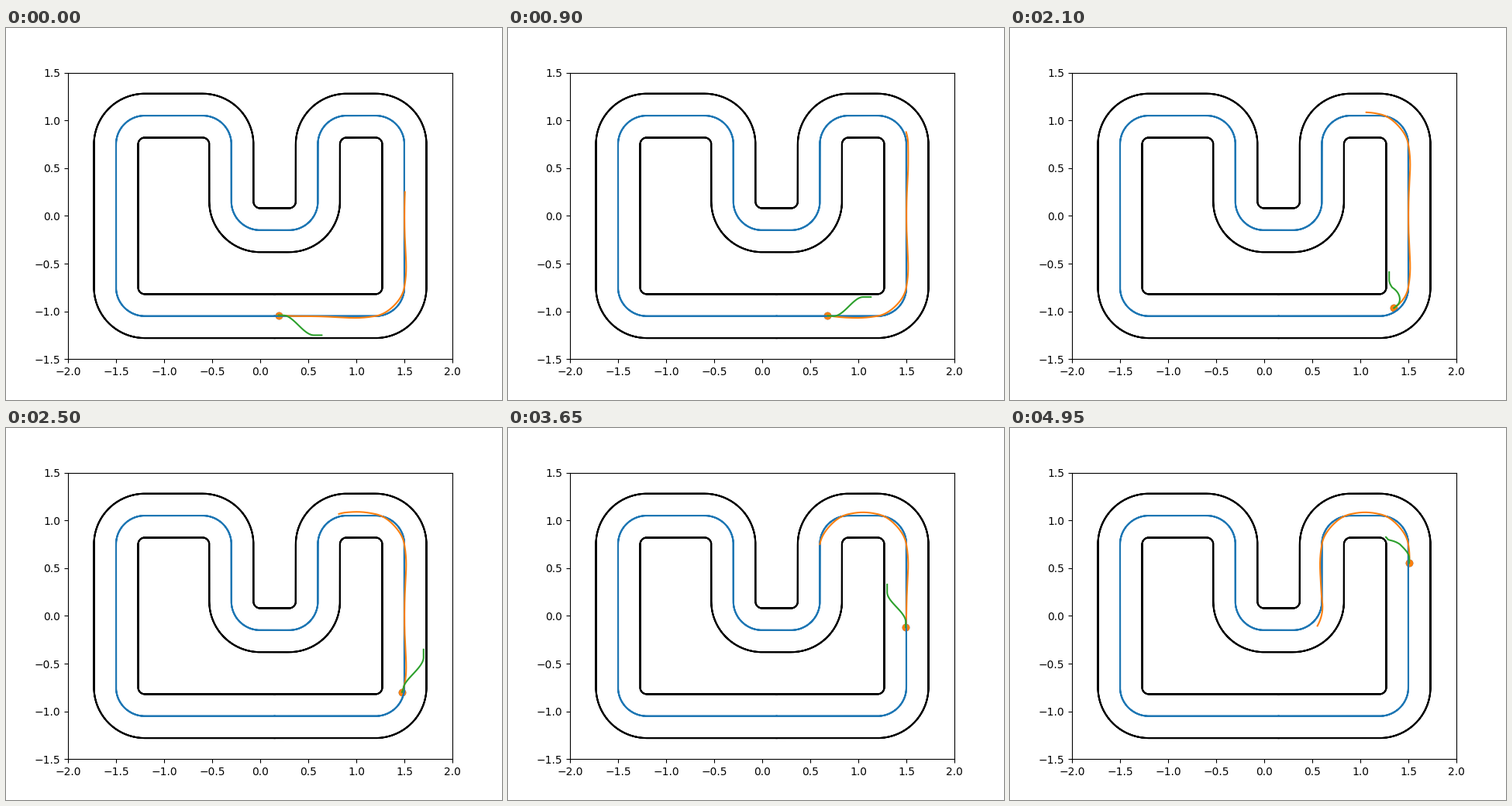
Recreate the animation shown at these times as a matplotlib script. Size 640 by 480 pixels, loop 5000 ms.

```python
import numpy as np
import matplotlib.pyplot as plt
from matplotlib.animation import FuncAnimation

FRAMES, STEP_MS = 100, 50
LAPS = 2
HALF_WIDTH = 0.23
RADIUS = 0.3
ARC = RADIUS * np.pi / 2

# Straight lengths, each followed by a quarter turn (+1 left, -1 right, 0 none).
STRAIGHTS = [1.05, 1.5, 0.3, 0.6, 0.3, 0.6, 0.6, 1.5, 1.35]
TURNS = [1, 1, 1, -1, -1, 1, 1, 1, 0]

# Car and horizon: time steps and distances along the track.
CAR = [0, 22, 73, 99], [0.04, 0.64, 2.15, 2.824]
HORIZON = [0, 22, 42, 58, 73, 99], [2.521, 3.28, 3.63, 4.105, 4.263, 5.1]
CAR_BIAS = 0.01

# The swerve aims at one side of the lane and flips at these steps.
FLIPS = [12, 50, 68, 77, 80, 87, 94]
SWERVE_SIDE, SWERVE_LENGTH = 0.2, 0.45


def build_segments():
    segments, s, pos, angle = [], 0.0, np.array([0.15, -1.05]), 0.0
    for length, turn in zip(STRAIGHTS, TURNS):
        segments.append((s, pos, angle, 0))
        heading = np.array([np.cos(angle), np.sin(angle)])
        pos, s = pos + length * heading, s + length
        if turn:
            segments.append((s, pos, angle, turn))
            normal = np.array([-heading[1], heading[0]])
            pos = pos + RADIUS * (heading + turn * normal)
            s, angle = s + ARC, angle + turn * np.pi / 2
    return segments, s


SEGMENTS, LAP = build_segments()
BENDS = [(s, turn) for s, _, _, turn in SEGMENTS if turn]


def place(s, offset):
    """Track coordinates (distance, offset to the left) to x, y."""
    s, offset = np.broadcast_arrays(np.asarray(s, float), offset)
    x, y = np.empty(s.shape), np.empty(s.shape)
    for start, pos, angle, turn in SEGMENTS:
        m = s >= start
        run = s[m] - start
        a = angle + turn * run / RADIUS
        if turn:
            px = pos[0] + turn * RADIUS * (np.sin(a) - np.sin(angle))
            py = pos[1] - turn * RADIUS * (np.cos(a) - np.cos(angle))
        else:
            px = pos[0] + run * np.cos(angle)
            py = pos[1] + run * np.sin(angle)
        x[m] = px - offset[m] * np.sin(a)
        y[m] = py + offset[m] * np.cos(a)
    return x, y


def drift(s):
    """Cut inside each left bend, swing wide before and after it."""
    total = 0
    for start, turn in BENDS:
        if turn > 0:
            d = s - start - ARC / 2
            total += 0.03 * (1 - (d / 0.24) ** 2) * np.exp(-(d / 0.27) ** 2 / 2)
    return total


def overshoot(s):
    """Outward error of a horizon that ends inside a bend."""
    return sum(-0.06 * turn * np.sin(np.pi * np.clip((s - start) / ARC, 0, 1))
               for start, turn in BENDS)


def smoothstep(t):
    t = np.clip(t, 0, 1)
    return t * t * (3 - 2 * t)


def fade(distance, reach):
    return np.clip(1 - distance / reach, 0, 1) ** 2


def planned_line(i):
    start, end = np.interp(i, *CAR), np.interp(i, *HORIZON)
    s = np.linspace(start, end, 260)
    offset = (drift(s) + CAR_BIAS * fade(s - start, 0.2)
              + overshoot(end) * fade(end - s, 0.35))
    return place(s, offset)


def swerve_line(i):
    u = np.linspace(0, 1, 80)
    s = np.interp(i, *CAR) + SWERVE_LENGTH * u
    side = -SWERVE_SIDE * (-1) ** np.searchsorted(FLIPS, i, side="right")
    base = drift(s) + CAR_BIAS * fade(u, 1)
    w = smoothstep((u - 0.12) / 0.7)
    return place(s, base * (1 - w) + side * w)


fig, ax = plt.subplots(figsize=(6.4, 4.8), dpi=100)
ax.set_xlim(-2, 2)
ax.set_ylim(-1.5, 1.5)

lap = np.linspace(0, LAPS * LAP, LAPS * 1000) % LAP
ax.plot(*place(lap, 0), color="C0")
for edge in (HALF_WIDTH, -HALF_WIDTH):
    ax.plot(*place(lap, edge), color="black")

plan, = ax.plot([], [], color="C1")
swerve, = ax.plot([], [], color="C2")
dots = [ax.scatter([0], [0], color=c) for c in ("C0", "C1")]


def update(i):
    x, y = planned_line(i)
    plan.set_data(x, y)
    swerve.set_data(*swerve_line(i))
    for dot in dots:
        dot.set_offsets([(x[0], y[0])])
    return plan, swerve, *dots


anim = FuncAnimation(fig, update, frames=FRAMES, interval=STEP_MS,
                     repeat=True, repeat_delay=0)
plt.show()
```
